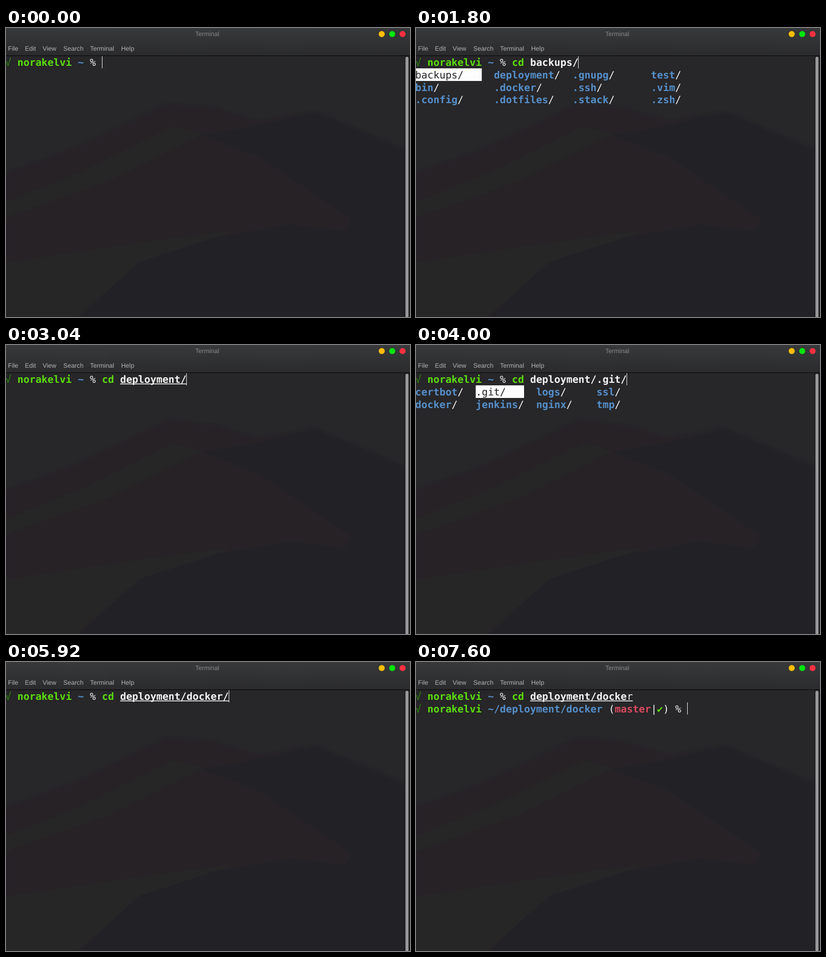
These frames come from a looping animation (800 by 573 pixels, 7640 ms). An HTML page:

```html
<!DOCTYPE html>
<html lang="en">
<head>
<meta charset="utf-8">
<title>Terminal</title>
<style>
  html, body { margin: 0; width: 100%; height: 100%; overflow: hidden; background: #262527; }
  svg { display: block; width: 800px; height: 573px; }
  text { text-rendering: geometricPrecision; white-space: pre; }
  .ui { font: 12.6px "Liberation Sans", Arial, sans-serif; fill: #b2b3b4; }
  .title { fill: #86888a; text-anchor: middle; }
  #screen { font: 19.876px "DejaVu Sans Mono", monospace; fill: #f4f4f4; }
  .bold { font-weight: bold; }
  .tick { fill: #2c8a0c; }
  .green { fill: #5bdd0c; font-weight: bold; }
  .blue { fill: #558fca; font-weight: bold; }
  .red { fill: #f04250; font-weight: bold; }
  .branch { fill: #d84a5e; }
  .picked { fill: #242426; }
</style>
</head>
<body>
<svg viewBox="0 0 800 573" xmlns="http://www.w3.org/2000/svg">
  <defs>
    <linearGradient id="bar" x1="0" y1="0" x2="0" y2="1">
      <stop offset="0" stop-color="#37393b"/>
      <stop offset="1" stop-color="#2b2b2d"/>
    </linearGradient>
    <filter id="soft"><feGaussianBlur stdDeviation="2"/></filter>
  </defs>
  <rect width="800" height="573" fill="#272628"/>
  <g filter="url(#soft)">
    <path d="M0 288 L140 237 L320 150 L420 160 L500 185 L612 165 L800 245 V580 H0Z" fill="#252427"/>
    <path d="M385 212 L480 198 L612 167 L800 247 V580 H140 L260 465 L390 420 L560 390 L670 402 L685 380 L500 255Z" fill="#242327"/>
    <path d="M0 345 L150 285 L330 195 L390 210 L200 305 L0 375Z" fill="#272628"/>
    <path d="M0 465 L250 428 L460 400 L265 463 L140 573 H0Z" fill="#272628"/>
  </g>
  <rect width="800" height="54" fill="url(#bar)"/>
  <rect y="54" width="800" height="2" fill="#161618"/>
  <rect x="789" y="56" width="11" height="517" fill="#1f1f22"/>
  <rect x="791" y="57" width="6" height="530" rx="3" fill="#98989a"/>
  <circle cx="744" cy="12" r="6" fill="#ffbd00"/>
  <circle cx="764.8" cy="12" r="6" fill="#00e70c"/>
  <circle cx="785.3" cy="12" r="6" fill="#ff3040"/>
  <text class="ui title" x="398.5" y="16.3">Terminal</text>
  <g class="ui">
    <text x="4" y="44.6">File</text>
    <text x="37.5" y="44.6">Edit</text>
    <text x="72.5" y="44.6">View</text>
    <text x="113.5" y="44.6">Search</text>
    <text x="166.5" y="44.6">Terminal</text>
    <text x="228" y="44.6">Help</text>
  </g>
  <g id="screen"></g>
</svg>
<script>
const LOOP = 7640, COL = 11.966, ROW = 24.8, LEFT = -1.4, TOP = 55.6;
const USER = 'norakelvi';
const screenBox = document.getElementById('screen');

// Completion lists, filled column by column.
const home = {
  rows: 3, pitch: 13,
  items: ['backups', 'bin', '.config', 'deployment', '.docker', '.dotfiles',
          '.gnupg', '.ssh', '.stack', 'test', '.vim', '.zsh'],
  cols: [0, 13, 26, 39], wide: [11, 11, 11, 11]
};
const deploy = {
  rows: 2,
  items: ['certbot', 'docker', '.git', 'jenkins', 'logs', 'nginx', 'ssl', 'tmp'],
  cols: [0, 10, 20, 30], wide: [8, 8, 8, 8]
};

const steps = [
  { at: 0 },
  { at: 400, cmd: 'c' },
  { at: 520, cmd: 'cd' },
  { at: 680, cmd: 'cd', space: true },
  { at: 1240, cmd: 'cd', space: true, menu: home },
  { at: 1560, cmd: 'cd', path: 'backups/', menu: home, pick: 'backups' },
  { at: 2240, cmd: 'cd', path: 'deployment/', menu: home, pick: 'deployment' },
  { at: 2880, cmd: 'cd', path: 'deployment/', line: true },
  { at: 3600, cmd: 'cd', path: 'deployment/', line: true, menu: deploy },
  { at: 3760, cmd: 'cd', path: 'deployment/certbot/', menu: deploy, pick: 'certbot' },
  { at: 3960, cmd: 'cd', path: 'deployment/.git/', menu: deploy, pick: '.git' },
  { at: 4400, cmd: 'cd', path: 'deployment/jenkins/', menu: deploy, pick: 'jenkins' },
  { at: 4600, cmd: 'cd', path: 'deployment/docker/', menu: deploy, pick: 'docker' },
  { at: 5080, cmd: 'cd', path: 'deployment/docker/', line: true },
  { at: 6200, cmd: 'cd', path: 'deployment/docker', line: true, run: true },
  { at: 6280, cmd: 'cd', path: 'deployment/docker', line: true, run: true, ready: true }
];

const colX = col => LEFT + col * COL;
const rowY = row => TOP + row * ROW;

function add(tag, attrs, content) {
  const el = document.createElementNS('http://www.w3.org/2000/svg', tag);
  for (const key in attrs) el.setAttribute(key, attrs[key]);
  if (content) el.textContent = content;
  screenBox.appendChild(el);
}

function put(row, col, str, cls = '') {
  add('text', { x: colX(col), y: rowY(row) + 19.4, class: cls }, str);
}

function block(x, y, width, height, fill) {
  add('rect', { x, y, width, height, fill });
}

function cursor(row, col) {
  block(Math.round(colX(col) - 0.5), Math.round(rowY(row)), 1, 24, '#f4f4f4');
}

function prompt(row, dir) {
  put(row, 0, '√', 'tick');
  put(row, 2, USER, 'green');
  put(row, 12, dir, 'blue');
}

function drawMenu(menu, pick) {
  menu.items.forEach((name, i) => {
    const c = Math.floor(i / menu.rows), row = 1 + i % menu.rows, col = menu.cols[c];
    if (name === pick) {
      block(colX(col), Math.round(rowY(row)), menu.wide[c] * COL, 25, '#fdfdfd');
      put(row, col, name + '/', 'picked');
    } else {
      put(row, col, name, 'blue');
      put(row, col + name.length, '/');
    }
  });
}

function drawPath(s) {
  const size = s.path.length, boldSize = s.run ? size - 1 : size;
  put(0, 19, s.path.slice(0, boldSize), 'bold');
  if (s.run) put(0, 19 + boldSize, s.path.slice(boldSize));
  if (s.line) block(colX(19), 76.4, size * COL, 1.6, '#f4f4f4');
}

function draw(s) {
  screenBox.textContent = '';
  prompt(0, '~');
  put(0, 14, '%');
  if (s.cmd) put(0, 16, s.cmd, s.cmd === 'cd' ? 'green' : 'red');
  if (s.path) drawPath(s);
  if (s.menu) drawMenu(s.menu, s.pick);
  if (s.ready) {
    prompt(1, '~/deployment/docker');
    put(1, 32, '(');
    put(1, 33, 'master', 'red branch');
    put(1, 39, '|');
    put(1, 40, '✔', 'green');
    put(1, 41, ')');
    put(1, 43, '%');
    cursor(1, 45);
  } else if (s.run) {
    cursor(1, 0.2);
  } else {
    const typed = s.path ? 3 + s.path.length : (s.cmd || '').length + (s.space ? 1 : 0);
    cursor(0, 16 + typed);
  }
}

let shown = null;
const start = performance.now();
function tick(now) {
  const t = Math.max(0, now - start) % LOOP;
  const s = steps.filter(step => step.at <= t).pop();
  if (s !== shown) draw(shown = s);
  requestAnimationFrame(tick);
}
tick(start);
</script>
</body>
</html>
```
